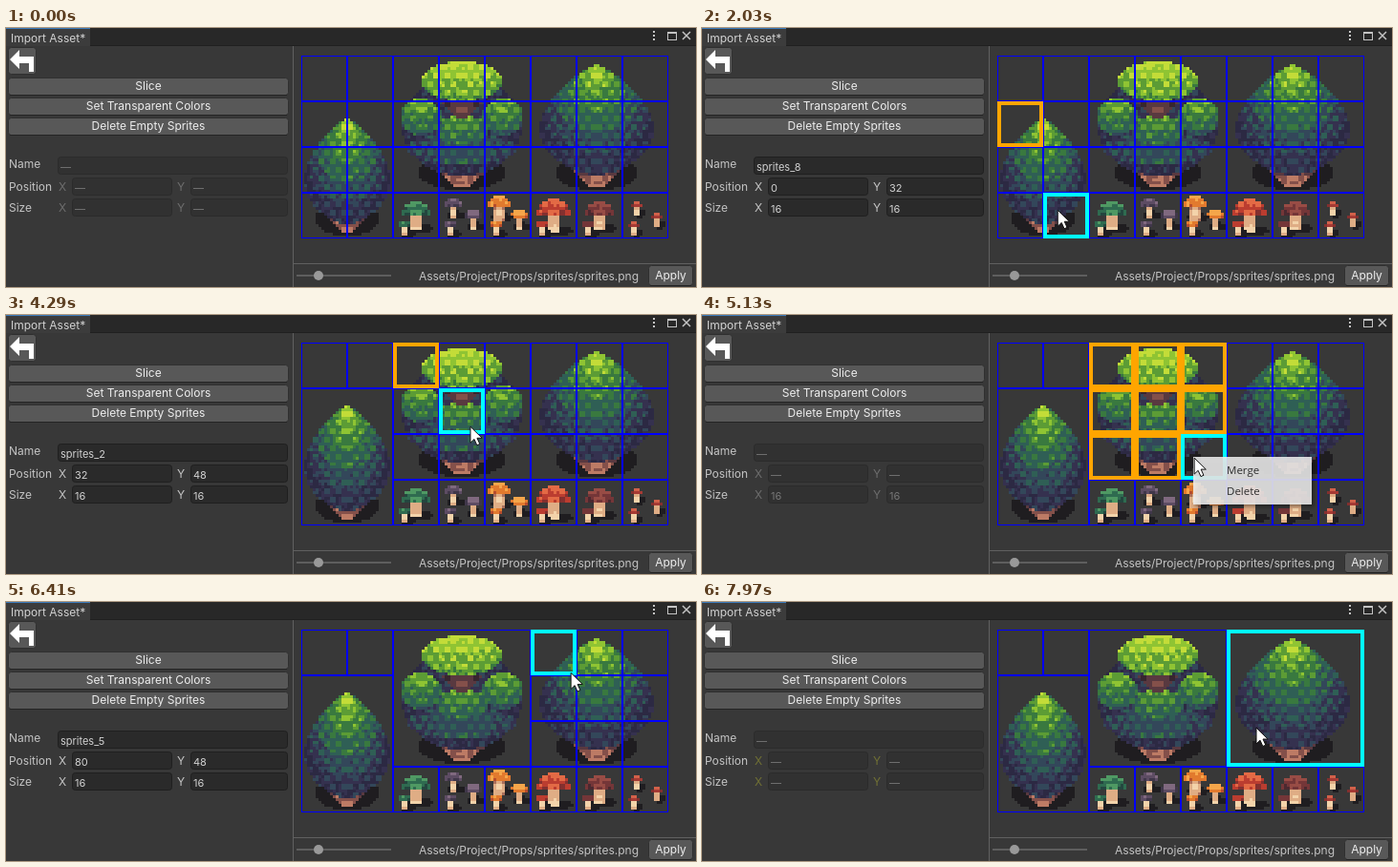
Animation of 722 by 272 pixels, one loop 8000 ms. Source, as an HTML page with a canvas:

```html
<!DOCTYPE html>
<html lang="en">
<head>
<meta charset="utf-8">
<title>Import Asset</title>
<style>
  html, body { margin: 0; width: 100%; height: 100%; overflow: hidden; background: #383838; }
  canvas { display: block; }
</style>
</head>
<body>
<canvas id="stage" width="722" height="272"></canvas>
<script>
const LOOP = 8000, CELL = 48, LEFT = 309, TOP = 29, COLS = 8, ROWS = 4;
const ctx = document.getElementById('stage').getContext('2d');
const clamp = (v, lo, hi) => Math.max(lo, Math.min(hi, v));
const lerp = (a, b, k) => a + (b - a) * k;

// ---- Sprite sheet, painted at one unit per art pixel ----
const sheet = document.createElement('canvas');
sheet.width = 128;
sheet.height = 64;
const art = sheet.getContext('2d');

const LEAF = ['#2c2943', '#35314f', '#33475a', '#2f5f55', '#39793f', '#5c9c35', '#8fc433', '#c3dc38'];
const BARK = ['#38262f', '#593940', '#84504a', '#bd7b65'];
const CREAM = ['#a96f5b', '#dfad85', '#f3d3aa'];
const SHADOW = ['#1f1d20'];

// Outlines give the half width (0 to 1) at a relative height v.
const egg = v => Math.sin(Math.PI * v ** 1.3) ** 0.6;
const disc = v => Math.sqrt(4 * v * (1 - v));
const cap = v => Math.sqrt(v * (2 - v));
const taper = v => 1 - v * 0.8;
const bar = () => 1;

const noise = (x, y) => {
  const n = Math.sin(x * 12.99 + y * 78.23) * 43758.55;
  return n - Math.floor(n);
};

// Symmetric leafy shape whose shade runs from its top to its bottom.
function paint(outline, cx, top, bottom, width, ramp, shadeTop = 0, shadeBottom = 0, dapple = 0) {
  for (let y = Math.round(top); y < bottom; y++) {
    const v = clamp((y + 0.5 - top) / (bottom - top), 0, 1), half = width * outline(v);
    for (let x = Math.round(cx - half); x < Math.round(cx + half); x++) {
      const d = Math.abs(x + 0.5 - cx), u = d / width;
      const inLeaf = (Math.floor(d) + Math.floor(y / 3) % 2 * 2) % 4 < 2 && y % 3 < 2;
      const shade = lerp(shadeTop, shadeBottom, v) - u * u + dapple * ((inLeaf ? 0.7 : -0.6) + noise(x, y) * 0.8);
      art.fillStyle = ramp[clamp(Math.round(shade), 0, ramp.length - 1)];
      art.fillRect(x, y, 1, 1);
    }
  }
}

const leaves = (cx, top, bottom, width, from, to, outline = egg) =>
  paint(outline, cx, top, bottom, width, LEAF, from, to, 1);

function roots(cx, ground, width) {
  paint(disc, cx, ground - 6, ground + 6, width * 0.72, SHADOW);
  paint(taper, cx, ground - 2, ground + 5, width * 0.5, BARK, 1, 3, 0.6);
}

// Nested tiers of foliage, each shorter, narrower and brighter than the one below.
function coneTree(cx, top, bottom, width) {
  for (let tier = 0; tier < 5; tier++) {
    const k = tier / 4, end = lerp(bottom, top, k * 0.78);
    leaves(cx, top, end, width * lerp(1, 0.22, k ** 1.4), 1.4 + tier * 1.3, 0.8 + tier * 1.1);
  }
}

function roundTree(cx, top, bottom, width) {
  leaves(cx, top + 5, bottom, width, 1.2, 0.6, disc);
  leaves(cx, bottom - 15, bottom - 4, width * 0.9, 2.2, 2.2, disc);
  leaves(cx, top + 19, top + 29, width * 0.45, 4.8, 3, disc);
  paint(taper, cx, top + 14, top + 20, width * 0.35, BARK, 0.7, 1.4, 0.6);
  for (const side of [-1, 1]) leaves(cx + side * width * 0.68, top + 13, top + 26, width * 0.34, 5.4, 2.6, disc);
  leaves(cx, top, top + 14, width * 0.66, 7, 4.6, disc);
}

function mushroom(cx, y, radius, ramp) {
  const foot = y + radius * 0.8 + 1;
  paint(disc, cx + 1, foot - 2, foot + 1, radius, SHADOW);
  paint(bar, cx, y, foot, Math.max(1, radius * 0.4), CREAM, 1.5, 1.5, 0.6);
  paint(cap, cx, y - radius, y, radius, ramp, 2.3, 0.6, 0.8);
}

function paintSheet() {
  roots(16, 57, 16);
  coneTree(16, 22, 59, 15);
  roots(56, 41, 21);
  roundTree(56, 2, 42, 21);
  roots(103, 41, 20);
  coneTree(103, 3, 42, 20);

  // One patch per cell: a main mushroom, with smaller ones around it.
  const patches = [
    [5, '#24463f', '#2f6b50', '#4f9963'], [3, '#40374a', '#5d4c63', '#80697f'],
    [4, '#b64d2d', '#e27a2e', '#f5a64a'], [6, '#83302f', '#bb3d30', '#e36a45'],
    [5, '#4a2930', '#743638', '#984c45'], [2, '#83302f', '#a63a34', '#d2614a']
  ];
  patches.forEach(([size, ...ramp], i) => {
    const x = (i + 2) * 16, small = Math.min(size, 3);
    if (size < 5) mushroom(x + 12, 57, small, ramp);
    mushroom(x + (size < 5 ? 5 : 8), size < 5 ? 53 : 56, size, ramp);
    mushroom(x + 4, 60, Math.min(size, 2.5), ramp);
  });
}

// ---- Timeline ----
// Each round: pick a cell, extend the selection to `end`, open the menu, choose Merge.
const ROUNDS = [
  { pick: 1350, extend: 2330, open: 2740, choose: 3335, col: 0, row: 1, w: 2, h: 3, end: [373, 193] },
  { pick: 3960, extend: 4760, open: 5030, choose: 5530, col: 2, row: 0, w: 3, h: 3, end: [515, 150] },
  { pick: 6350, extend: 6870, open: 7150, choose: 7450, col: 5, row: 0, w: 3, h: 3, end: [655, 150] }
];
const ENTER = 380, MERGE_DELAY = 100, MENU_FADE = 190;
const merged = (r, t) => t >= r.choose + MERGE_DELAY;

const legs = [];
const move = (start, time, to) => legs.push({ start, time, to });
const approach = (start, until, to) => move(start, Math.min(540, until - start - 60), to);
let free = ENTER;
for (const r of ROUNDS) {
  approach(free, r.pick, [LEFT + (r.col + 0.5) * CELL, TOP + (r.row + 0.5) * CELL]);
  move(r.pick, Math.min(790, r.extend - r.pick), r.end);
  move(r.open + 100, (r.choose - r.open) / 2, [r.end[0] + 19, r.end[1] + 13]);
  free = r.choose + 180;
}
approach(free, LOOP, [580, 132]);

function cursorAt(t) {
  let [x, y] = [354, 272];
  for (const { start, time, to } of legs) {
    const k = clamp((t - start) / time, 0, 1), eased = k * (2 - k);
    x = lerp(x, to[0], eased);
    y = lerp(y, to[1], eased);
  }
  return [x, y];
}

const covers = (r, col, row) => col >= r.col && col < r.col + r.w && row >= r.row && row < r.row + r.h;

function spritesAt(t) {
  const joined = ROUNDS.filter(r => merged(r, t)), list = [...joined];
  for (let row = 0; row < ROWS; row++)
    for (let col = 0; col < COLS; col++)
      if (!joined.some(r => covers(r, col, row))) list.push({ col, row, w: 1, h: 1 });
  return list;
}

// ---- Drawing helpers ----
function rect(x, y, w, h, color) {
  ctx.fillStyle = color;
  ctx.fillRect(x, y, w, h);
}

function box(x, y, w, h, fill, edge) {
  ctx.beginPath();
  ctx.roundRect(x + 0.5, y + 0.5, w - 1, h - 1, 3);
  ctx.fillStyle = fill;
  ctx.fill();
  ctx.lineWidth = 1;
  ctx.strokeStyle = edge;
  ctx.stroke();
}

function text(str, x, y, color = '#d2d2d2', align = 'left', font = '12px Inter, sans-serif') {
  ctx.font = font;
  ctx.textAlign = align;
  ctx.fillStyle = color;
  ctx.fillText(str, x, y);
}

function outline(s, color, thick) {
  ctx.lineWidth = thick;
  ctx.strokeStyle = color;
  ctx.strokeRect(LEFT + s.col * CELL + thick / 2, TOP + s.row * CELL + thick / 2,
    s.w * CELL - thick, s.h * CELL - thick);
}

function button(label, x, y, w, h) {
  box(x, y, w, h, '#585858', '#303030');
  rect(x + 2, y + h - 1, w - 4, 1, '#242424');
  text(label, x + w / 2, y + Math.floor(h / 2) + 4, '#eeeeee', 'center');
}

const BACK_ARROW = new Path2D('M4 33L14 23V30H29V46H24V37H14V43Z');
const POINTER = new Path2D('M0 0V17L4 13.2L6.8 19.5L9.8 18.2L7 12H12.2Z');
const CLOSE = new Path2D('M708 4l8 8m0-8l-8 8');

function drawWindow() {
  rect(0, 0, 722, 272, '#383838');
  rect(0, 0, 722, 19, '#282828');
  rect(0, 0, 88, 19, '#3c3c3c');
  rect(0, 0, 88, 1, '#3a79bb');
  rect(88, 18, 634, 1, '#202020');
  text('Import Asset*', 5, 15);
  for (const y of [3, 7, 11]) rect(677, y, 2, 2, '#c4c4c4');
  ctx.strokeStyle = '#c4c4c4';
  ctx.lineWidth = 1;
  ctx.strokeRect(692.5, 4.5, 9, 8);
  rect(692, 4, 10, 2, '#c4c4c4');
  ctx.lineWidth = 1.5;
  ctx.stroke(CLOSE);

  box(2, 20, 30, 29, '#585858', '#303030');
  ctx.fillStyle = '#ffffff';
  ctx.fill(BACK_ARROW);
  ['Slice', 'Set Transparent Colors', 'Delete Empty Sprites'].forEach((label, i) => button(label, 2, 52 + i * 21, 294, 19));

  rect(300, 19, 1, 253, '#606060');
  rect(301, 247, 421, 1, '#606060');
  rect(304, 259, 99, 2, '#5e5e5e');
  ctx.beginPath();
  ctx.arc(327, 260, 5, 0, 7);
  ctx.fillStyle = '#999999';
  ctx.fill();
  text('Assets/Project/Props/sprites/sprites.png', 662, 265, '#c4c4c4', 'right');
  button('Apply', 672, 249, 47, 22);
}

function drawPanel(t, round) {
  const single = round && t < round.extend;
  const dim = t >= ROUNDS[2].extend ? '#707034' : '#6d6d6d';
  const axis = single ? '#c4c4c4' : dim;
  const field = (value, x, y, w) => {
    box(x, y, w, 19, single ? '#2a2a2a' : '#313131', single ? '#1f1f1f' : '#2b2b2b');
    text(value, x + 3, y + 15, single ? '#d2d2d2' : '#777777', 'left', '11px Inter, sans-serif');
  };
  const pair = (label, y, a, b) => {
    text(label, 3, y + 14, '#c4c4c4');
    text('X', 55, y + 14, axis);
    text('Y', 179, y + 14, axis);
    field(a, 69, y, 105);
    field(b, 193, y, 102);
  };
  const size = round ? '16' : '—';
  text('Name', 3, 147, '#c4c4c4');
  field(single ? 'sprites_' + (round.row * COLS + round.col) : '—', 54, 135, 241);
  pair('Position', 157, single ? round.col * 16 : '—', single ? (ROWS - 1 - round.row) * 16 : '—');
  pair('Size', 179, size, size);
}

function drawMenu(t, round, mx, my) {
  const [x, y] = round.end.map(v => v - 1), chosen = t >= round.choose;
  const item = (label, top) => text(label, x + 35, top, '#111111', 'left', '11.5px "Open Sans", sans-serif');
  ctx.save();
  ctx.globalAlpha = chosen ? clamp(0.95 - (t - round.choose) / MENU_FADE, 0, 1) : clamp(0.3 + (t - round.open) / 180, 0, 1);
  if (!chosen) {
    ctx.shadowColor = 'rgba(0,0,0,0.5)';
    ctx.shadowBlur = 4;
    ctx.shadowOffsetX = ctx.shadowOffsetY = 2;
    rect(x, y, 124, 50, '#f2f2f2');
    ctx.shadowColor = 'transparent';
    item('Delete', y + 40);
  }
  if (chosen || (mx > x + 3 && my > y + 3)) rect(x + 3, y + 3, 118, 22, '#91c9f7');
  item('Merge', y + 18);
  ctx.restore();
}

function drawCursor(x, y) {
  ctx.save();
  ctx.translate(x, y);
  ctx.fillStyle = '#ffffff';
  ctx.strokeStyle = '#111111';
  ctx.lineWidth = 1;
  ctx.fill(POINTER);
  ctx.stroke(POINTER);
  ctx.restore();
}

function draw(t) {
  const round = ROUNDS.find(r => t >= r.pick && !merged(r, t));
  const menu = ROUNDS.find(r => t >= r.open && t < r.choose + MENU_FADE);
  const [mx, my] = cursorAt(t);
  drawWindow();
  drawPanel(t, round);

  ctx.imageSmoothingEnabled = false;
  ctx.drawImage(sheet, LEFT, TOP, COLS * CELL, ROWS * CELL);
  const sprites = spritesAt(t);
  sprites.forEach(s => outline(s, '#0000ff', 1));
  if (round) {
    const range = t < round.extend ? { ...round, w: 1, h: 1 } : round;
    sprites.filter(s => covers(range, s.col, s.row)).forEach(s => outline(s, '#ffa500', 4));
  }
  if (t < ENTER) return;

  const [hx, hy] = menu ? menu.end : [mx, my];
  const col = Math.floor((hx - LEFT) / CELL), row = Math.floor((hy - TOP) / CELL);
  const hovered = sprites.find(s => covers(s, col, row));
  if (hovered) outline(hovered, '#00ffff', 4);
  if (menu) drawMenu(t, menu, mx, my);
  drawCursor(mx, my);
}

paintSheet();
const start = performance.now();
function tick() {
  draw((performance.now() - start) % LOOP);
  requestAnimationFrame(tick);
}
tick();
</script>
</body>
</html>
```
